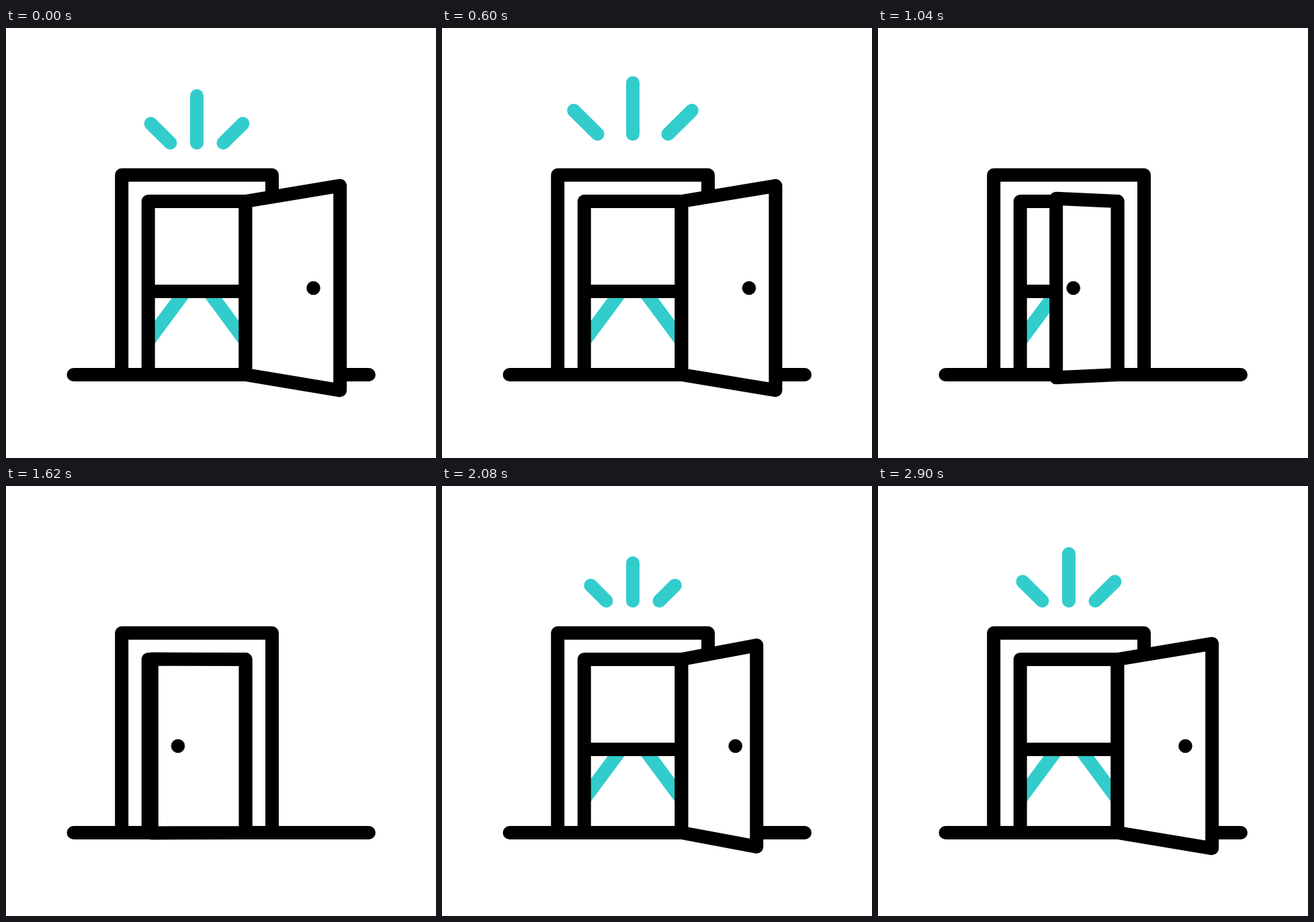
Animation, 640 px wide and 640 px high, one loop 2920 ms. Source, as an HTML page without scripts:

```html
<!DOCTYPE html>
<html lang="en">
<head>
<meta charset="utf-8">
<title>Door</title>
<style>
  html, body { margin: 0; width: 100%; height: 100%; overflow: hidden; background: #fff; }
  svg { display: block; width: 100%; height: 100%; }

  .ink, .ray, .beam { fill: none; stroke-width: 20; stroke-linecap: round; stroke-linejoin: round; }
  .ink { stroke: #000; }
  .ray, .beam { stroke: #3cc; }

  .rays, .ray, .door, .knob {
    animation: 2920ms cubic-bezier(.333, 0, .667, 1) infinite;
  }

  .rays { animation-name: grow; }
  .ray { d: var(--rest); animation-name: pulse; }
  .left   { --rest: path("M244.5 171L215.5 142.3"); --peak: path("M218.5 144.5L176 102.5"); }
  .middle { --rest: path("M284 171L284 101"); --peak: path("M284 144.5L284 61"); }
  .right  { --rest: path("M323.5 171L352.5 142.3"); --peak: path("M349.5 144.5L392 102.5"); }

  .door {
    fill: #fff;
    --open: path("M356.5 258L497.2 234.7L497.2 539.3L356.5 516Z");
    --shut: path("M356.5 258L212 258L212 516L356.5 516Z");
    d: var(--open);
    animation-name: swing;
  }
  .knob { animation-name: slide; }

  @keyframes pulse {
    0%, 27.4%, 72.16%, 99.55%, 100% { d: var(--rest); }
    13.7%, 85.86% { d: var(--peak); }
  }
  @keyframes grow {
    0%, 19.93%, 75.17%, 100% { stroke-dasharray: 1 3; }
    33.63%, 61.47% { stroke-dasharray: 0 3; }
    0%, 33.63%, 61.47%, 100% { opacity: 1; }
    33.64%, 61.46% { opacity: 0; }
  }
  @keyframes swing {
    0%, 19.93%, 75.55%, 100% { d: var(--open); }
    41.64%, 53.84% { d: var(--shut); }
  }
  @keyframes slide {
    0%, 19.93%, 75.55%, 100% { transform: translateX(0); }
    41.64%, 53.84% { transform: translateX(-205px); }
  }
</style>
</head>
<body>
<svg viewBox="0 0 640 640">
  <defs>
    <clipPath id="inside"><rect x="212" y="392" width="144" height="124"/></clipPath>
  </defs>

  <g class="rays">
    <path class="ray left" pathLength="1"/>
    <path class="ray middle" pathLength="1"/>
    <path class="ray right" pathLength="1"/>
  </g>

  <g clip-path="url(#inside)">
    <path class="beam" d="M266.5 392L207 472.3M301.5 392L361 472.3"/>
  </g>

  <path class="ink" d="M172.2 516V218.8H396V516"/>
  <path class="ink" d="M211.7 516V258H356.5V516M211.7 392H356.5"/>
  <path class="ink" d="M100.5 516H540"/>

  <path class="ink door"/>
  <circle class="knob" cx="457.5" cy="387" r="10.3"/>
</svg>
</body>
</html>
```
